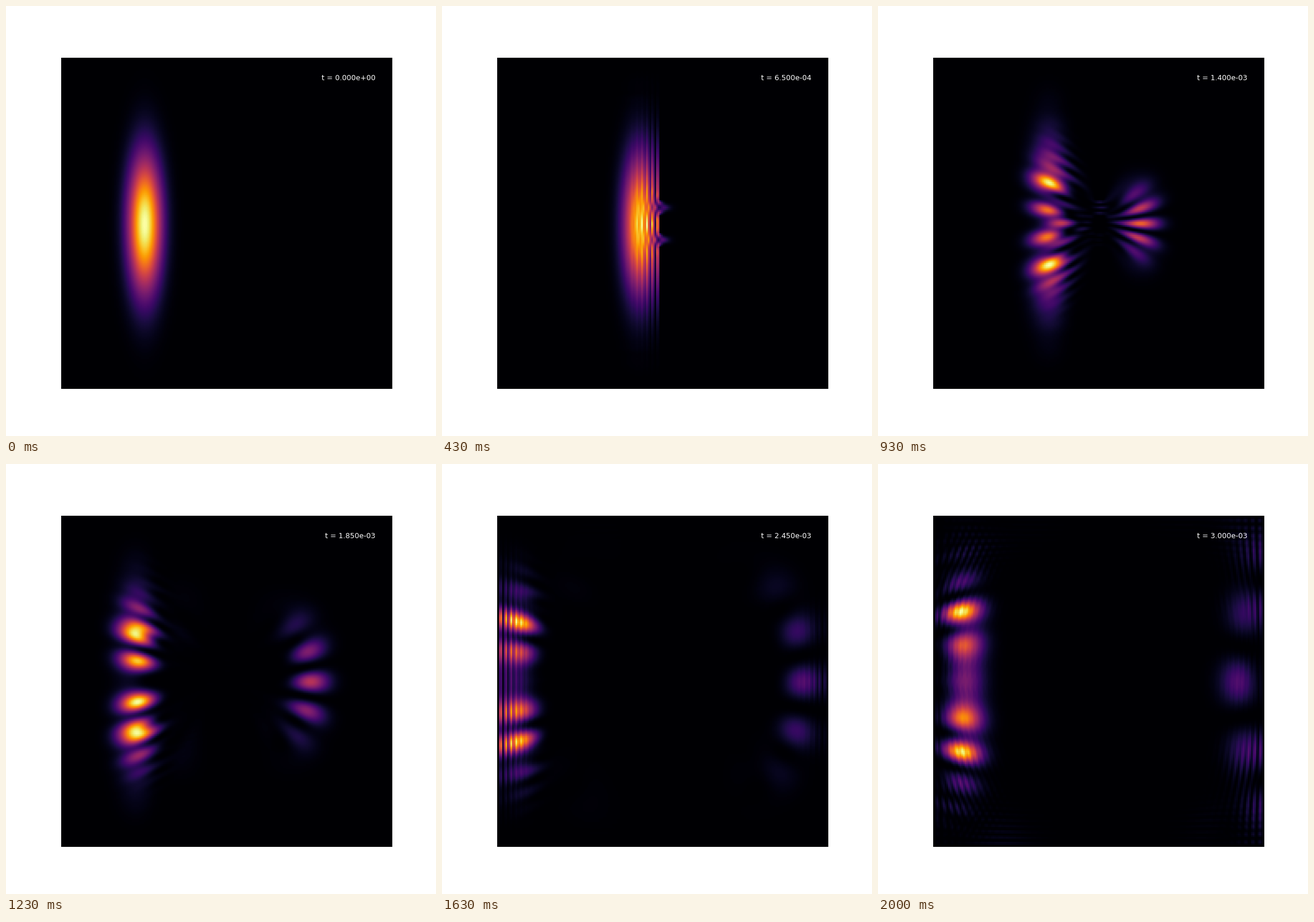
These frames come from a looping animation (748x748 px, 2.03 s). A matplotlib script:

```python
import numpy as np
import matplotlib.pyplot as plt
from matplotlib.animation import FuncAnimation
from numpy.polynomial.chebyshev import chebinterpolate

# Gaussian wave packet hitting a double slit: i du/dt = -lap(u) + V u,
# zero on the border, advanced with Crank-Nicolson steps.
H, DT = 0.005, 2.5e-5
N = 200
STATES = 61          # shown states, two time steps apart
TICK = 10            # ms
LOOP = 2030          # ms

grid = np.arange(N) * H
X, Y = np.meshgrid(grid, grid)

# Cells where the wave may live: not the border, not the wall
free = np.zeros((N, N))
free[1:-1, 1:-1] = 1
wall = np.ones(N, bool)
wall[86:95] = False
wall[106:114] = False
free[wall, 98:103] = 0


def hop(u):
    """Scaled kinetic operator with its spectrum in [-1, 1]."""
    s = np.zeros_like(u)
    s[1:-1, 1:-1] = u[:-2, 1:-1] + u[2:, 1:-1] + u[1:-1, :-2] + u[1:-1, 2:]
    s *= -0.25 * free
    return s


def cayley(z):
    x = 2 * DT / H**2 * (1 + z)
    return (1 - 1j * x) / (1 + 1j * x)


coef = chebinterpolate(cayley, 22)


def step(u):
    """One Crank-Nicolson step as a Chebyshev series in hop."""
    a, b = u, hop(u)
    out = coef[0] * a + coef[1] * b
    for c in coef[2:]:
        a, b = b, 2 * hop(b) - a
        out += c * b
    return out


def simulate():
    u = np.exp(-(X - 0.25)**2 / (2 * 0.05**2)
               - (Y - 0.5)**2 / (2 * 0.2**2) + 200j * X) * free
    u /= np.sqrt(np.sum(np.abs(u)**2))
    out = [np.abs(u)**2]
    for _ in range(STATES - 1):
        u = step(step(u))
        out.append(np.abs(u)**2)
    return out


def cells(p):
    """Flat square cells, so that smoothing only touches their edges."""
    return p.repeat(3, axis=0).repeat(3, axis=1)


density = simulate()

fig = plt.figure(figsize=(10, 10), dpi=74.8, facecolor="white")
ax = fig.add_axes([0.128, 0.11, 0.77, 0.77])
ax.axis("off")
img = ax.imshow(cells(density[0]), extent=[0, 1, 0, 1], cmap="inferno",
                interpolation="hanning", vmin=0, vmax=density[0].max())
label = fig.text(0.859, 0.8415, "", color="white", fontsize=12,
                 family="DejaVu Sans", ha="right", va="top")


def draw(n):
    # 30 states per second, switched on the nearest 10 ms tick
    k = min(int((n + 0.5) * 0.3), STATES - 1)
    img.set_data(cells(density[k]))
    img.set_clim(0, density[k].max())
    label.set_text(f"t = {k * 2 * DT:.3e}")
    return img, label


anim = FuncAnimation(fig, draw, frames=LOOP // TICK, interval=TICK,
                     repeat=True, repeat_delay=0, cache_frame_data=False)
plt.show()
```
